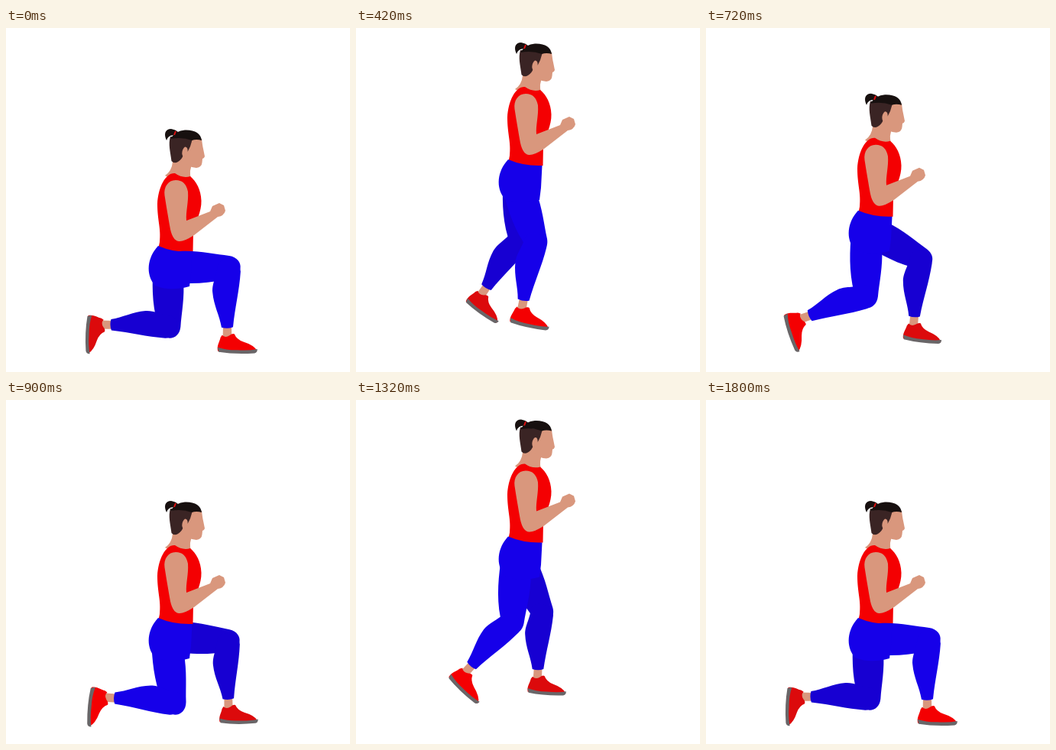
An HTML page for the animation above (1.86 s loop, 450 by 450 pixels).

```html
<!DOCTYPE html>
<html lang="en">
<head>
<meta charset="utf-8">
<title>Jumping lunges</title>
<style>
  html, body { margin: 0; width: 100%; height: 100%; overflow: hidden; background: #fff; }
  svg { display: block; width: 100%; height: 100%; }
  .skin { fill: #d9977d; }
  .red { fill: #f40002; }
  .pants { fill: #1600e9; }
  .far { --shoe: #dc0a0c; }
  .far .pants { fill: #1700d2; }
  .shoe { fill: var(--shoe, #f40002); }
  .sole { fill: #696668; }
</style>
</head>
<body>
<svg viewBox="0 0 450 450">
  <defs>
    <path id="thigh" d="M-18 0C-20 22-22 50-15 78C-14 104 13 105 16 84C18 65 23 45 22 20L18-5Z"/>
    <path id="shin" d="M-14-4C-16 14-21 20-20 32C-18 50-10 62-7 78Q1 80 8 77C10 50 15 30 16 4C15-12-11-15-14-4Z"/>
    <g id="foot">
      <path class="skin" d="M-5 74H6L6.500 90L-5 92Z"/>
      <path class="shoe" d="M-6 88Q-2 92 4 88Q7 85 10 86Q13 93 22 96Q36 100 40 107L39 109H-11C-13 102-9 97-8 91Z"/>
      <path class="sole" d="M-11.500 104Q0 107.500 14 107Q30 107.500 40.500 105Q41 109.500 37 110.500Q12 113-10 110Z"/>
    </g>
  </defs>
  <g id="body">
    <g id="far" class="far">
      <use class="pants" href="#thigh"/>
      <g class="lower"><use href="#foot"/><use class="pants" href="#shin"/></g>
    </g>

    <path class="skin" d="M230 166L244 178Q239 186 242 197Q230 206 208 193Q217 187 218 175Z"/>
    <path class="skin" d="M236 146L256 145Q257 154 258 158L260 168Q259 171 257 171L256.500 176Q256 182 249 183Q239 183 229 172Z"/>
    <path fill="#3a2424" d="M215 142C212 152 215 162 216.500 174Q220 178 225 175Q230 172 232 166L238 161L241 155L244 145Z"/>
    <path fill="#17100f" d="M215 145Q222 134 234 133.500C247 133 255 138 256 147Q249 145 243 147Q230 142 215 145Z"/>
    <path fill="#17100f" d="M210 147C206 139 208 132 216 132Q222 133 225 136L223 141Q213 138 210 147Z"/>
    <path d="M222 135L220 140" stroke="#e01010" stroke-width="2"/>
    <ellipse class="skin" cx="234" cy="162" rx="3.500" ry="6.500" transform="rotate(12 234 162)"/>

    <path class="red" d="M221 190C209 189 199 208 198 230C198 252 203 262 201 280L199 290Q222 297 244.500 293L245 266C248 254 256 240 255.500 226C255 211 249 201 241 194Q231 197 221 190Z"/>
    <path class="skin" d="M222 199C212 199 206 208 207.500 219C210 235 212 246 214 258Q217 278 226 279Q232 280 246 271L277 247Q285 246 287 239L285 232L279 229L270 233L267 240L236 252C235 240 239 228 238 214Q235 199 222 199Z"/>

    <g id="near">
      <use class="pants" href="#thigh"/>
      <g class="lower"><use href="#foot"/><use class="pants" href="#shin"/></g>
    </g>
    <path class="pants" d="M199 285Q220 294 243.500 293L242 322L240 338Q214 345 195 337C182 322 185 300 199 285Z"/>
  </g>
</svg>
<script>
const HALF = 930, STEP = 60, THIGH = 83;

// One leg going from front to back: [ms, thigh forward, shin backward] in degrees
const swing = (front, back, bend) => [
  [72, ...front], [240, 56, 8], [315, 46, 4 + bend], [390, 24, 4],
  [540, -3, 43], [615, -3, 56 + bend], [690, -1, 66], [858, ...back]
];

const legs = [
  { el: document.getElementById('near'), hip: [208, 314], size: 1, keys: swing([90, 1.5], [8, 95], 7) },
  { el: document.getElementById('far'), hip: [210, 310], size: 0.97, keys: swing([86, 0], [2, 92], -7) }
];
const body = document.getElementById('body');

const clamp = (v, lo, hi) => Math.min(hi, Math.max(lo, v));

function sample(keys, t) {
  t = clamp(t, keys[0][0], keys[keys.length - 1][0]);
  const i = Math.max(1, keys.findIndex(k => k[0] >= t));
  const a = keys[i - 1], b = keys[i];
  const f = (t - a[0]) / (b[0] - a[0]);
  return [1, 2].map(n => a[n] + (b[n] - a[n]) * f);
}

function poseLeg({ el, hip, size, keys }, t) {
  const [thigh, shin] = sample(keys, t);
  el.setAttribute('transform', `translate(${hip}) scale(${size}) rotate(${-thigh})`);
  el.querySelector('.lower').setAttribute('transform', `translate(0 ${THIGH}) rotate(${shin + thigh})`);
}

function draw() {
  const t = Math.floor(performance.now() % (2 * HALF) / STEP) * STEP;
  const phase = t <= HALF ? t : 2 * HALF - t;
  const lift = clamp(0.335 * (Math.min(phase, HALF - phase) - 72), 0, 113);
  body.setAttribute('transform', `translate(0 ${-lift})`);
  poseLeg(legs[0], phase);
  poseLeg(legs[1], HALF - phase);
  requestAnimationFrame(draw);
}
draw();
</script>
</body>
</html>
```
